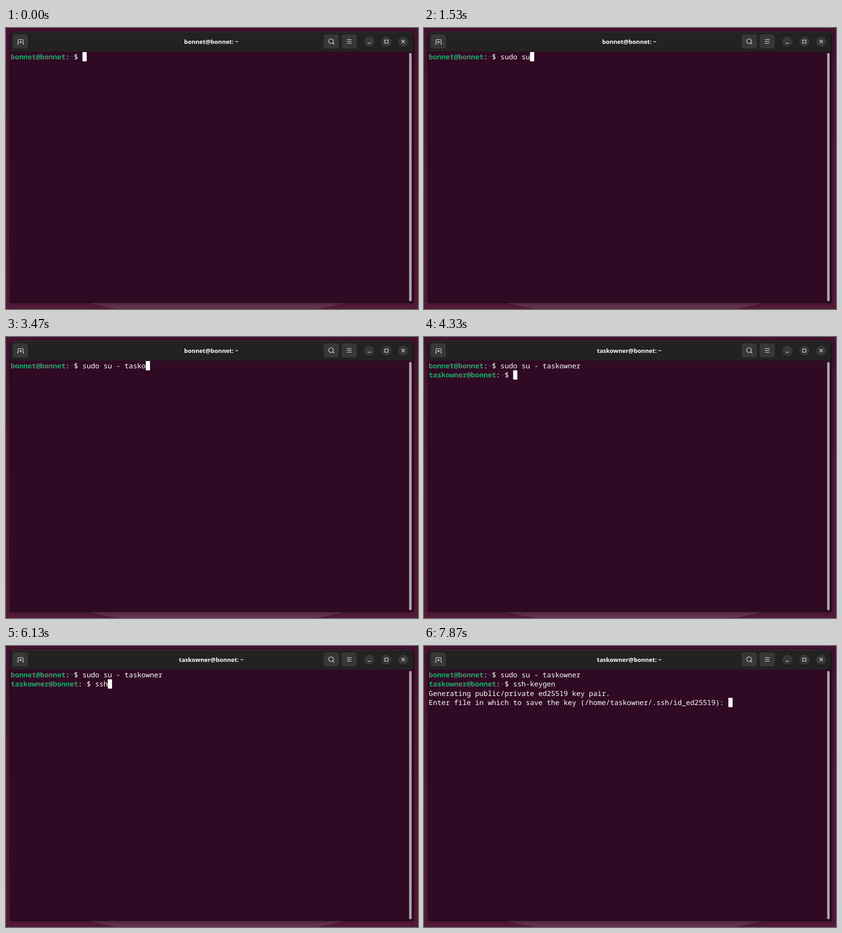
Animation, 905 px wide and 619 px high, one loop 8 s. Source, as an HTML page:

```html
<!DOCTYPE html>
<html lang="en">
<head>
<meta charset="utf-8">
<title>Terminal</title>
<style>
  html, body { margin: 0; width: 100%; height: 100%; overflow: hidden; }
  body { position: relative; background: linear-gradient(#451330, #511938 50%, #541a3a); }
  svg { position: absolute; left: 0; top: 0; }
  #window {
    position: absolute; left: 9px; top: 8px; width: 886px; height: 597px; box-sizing: border-box;
    border: 1px solid #1c0615; border-top-color: #3a3a3a; border-radius: 12px 12px 0 0;
    background: linear-gradient(#222 43px, #300a24 43px);
    box-shadow: 0 0 0 1px rgba(0, 0, 0, .25), 0 2px 9px rgba(0, 0, 0, .4);
  }
  #title {
    position: absolute; left: 0; top: 20px; width: 902px;
    text-align: center; color: #fff; font: bold 13px/20px "Noto Sans", sans-serif;
  }
  #screen {
    position: absolute; left: 10.4px; top: 53px; margin: 0; color: #fff;
    font: 15.45px/20.4px "Noto Sans Mono", monospace;
    text-rendering: geometricPrecision; font-variant-ligatures: none;
  }
  #screen b { color: #26a269; }
  #screen i { color: #12488b; font-style: normal; font-weight: bold; }
</style>
</head>
<body>
<svg width="905" height="619"><ellipse cx="463" cy="560" rx="353" ry="75" fill="#fff" opacity=".1"/></svg>
<div id="window"></div>
<svg width="905" height="619" fill="none" stroke="#fff" stroke-width="1.1">
  <g fill="#373737" stroke="none">
    <rect x="15" y="14" width="33" height="31" rx="5.5"/>
    <rect x="698" y="14" width="33" height="31" rx="5.5"/>
    <rect x="737.5" y="14" width="33" height="31" rx="5.5"/>
    <circle cx="798" cy="30" r="11"/>
    <circle cx="835.5" cy="30" r="11"/>
    <circle cx="872.5" cy="30" r="11"/>
  </g>
  <path d="M24.5 35.5h2v-8.5q0-1.5 1.5-1.5h8q1.5 0 1.5 1.5v8.5h2M32 28v6M29 31h6"/>
  <circle cx="714" cy="29" r="5.2"/>
  <path d="M718 33l3 3M749 25.5h10M749 29.5h10M749 33.5h10M794.5 33.5h7M832 26.5h7v7h-7zM869 26.5l7 7M876 26.5l-7 7"/>
  <rect x="885.5" y="55" width="5.5" height="547" rx="2.7" fill="#aca5a9" stroke="none"/>
  <rect id="cursor" width="9.27" height="20.4" fill="#fff" stroke="none"/>
</svg>
<div id="title"></div>
<pre id="screen"></pre>
<script>
const LOOP = 8000, LEFT = 10.4, TOP = 53, CELL = 9.27, ROW = 20.4;
const HOST = 'bonnet', USER = 'taskowner';

const login = {
  user: HOST, text: `sudo su - ${USER}`, shown: 0, enter: 4270,
  keys: [730, 870, 930, 1070, 1200, 1330, 1530, 2270, 2530, 2670,
         3070, 3130, 3270, 3400, 3470, 3600, 3730, 4000, 4070]
};
const keygen = {
  user: USER, text: 'ssh-keygen', shown: 4330, enter: 7800,
  keys: [5800, 5930, 6130, 6400, 6670, 6730, 6800, 7070, 7130, 7270]
};
const output = [
  'Generating public/private ed25519 key pair.',
  `Enter file in which to save the key (/home/${USER}/.ssh/id_ed25519): `
];
const OUTPUT_AT = 7870;
const blinks = [[2130, 2270], [4870, 5470]];

const byId = id => document.getElementById(id);
const title = byId('title'), terminal = byId('screen'), cursor = byId('cursor');

const typed = (cmd, t) => cmd.text.slice(0, cmd.keys.filter(k => k <= t).length);
const promptHtml = user => `<b>${user}@${HOST}</b>:<i>~</i>$ `;
const promptLength = user => `${user}@${HOST}:~$ `.length;

function stateAt(t) {
  const lines = [];
  let row = 0, col = 0;
  for (const cmd of [login, keygen]) {
    if (t < cmd.shown) break;
    const text = typed(cmd, t);
    lines.push(promptHtml(cmd.user) + text);
    col = promptLength(cmd.user) + text.length;
    if (t >= cmd.enter) { row++; col = 0; }
  }
  if (t >= OUTPUT_AT) {
    lines.push(...output);
    row = lines.length - 1;
    col = output[1].length;
  }
  return { html: lines.join('\n'), row, col };
}

let lastHtml;
function draw() {
  const t = performance.now() % LOOP;
  const { html, row, col } = stateAt(t);
  if (html !== lastHtml) terminal.innerHTML = lastHtml = html;
  title.textContent = `${t < keygen.shown ? HOST : USER}@${HOST}: ~`;

  const hidden = blinks.some(([off, on]) => t >= off && t < on);
  cursor.setAttribute('x', LEFT + col * CELL);
  cursor.setAttribute('y', TOP + row * ROW);
  cursor.setAttribute('visibility', hidden ? 'hidden' : 'visible');
  requestAnimationFrame(draw);
}
draw();
</script>
</body>
</html>
```
